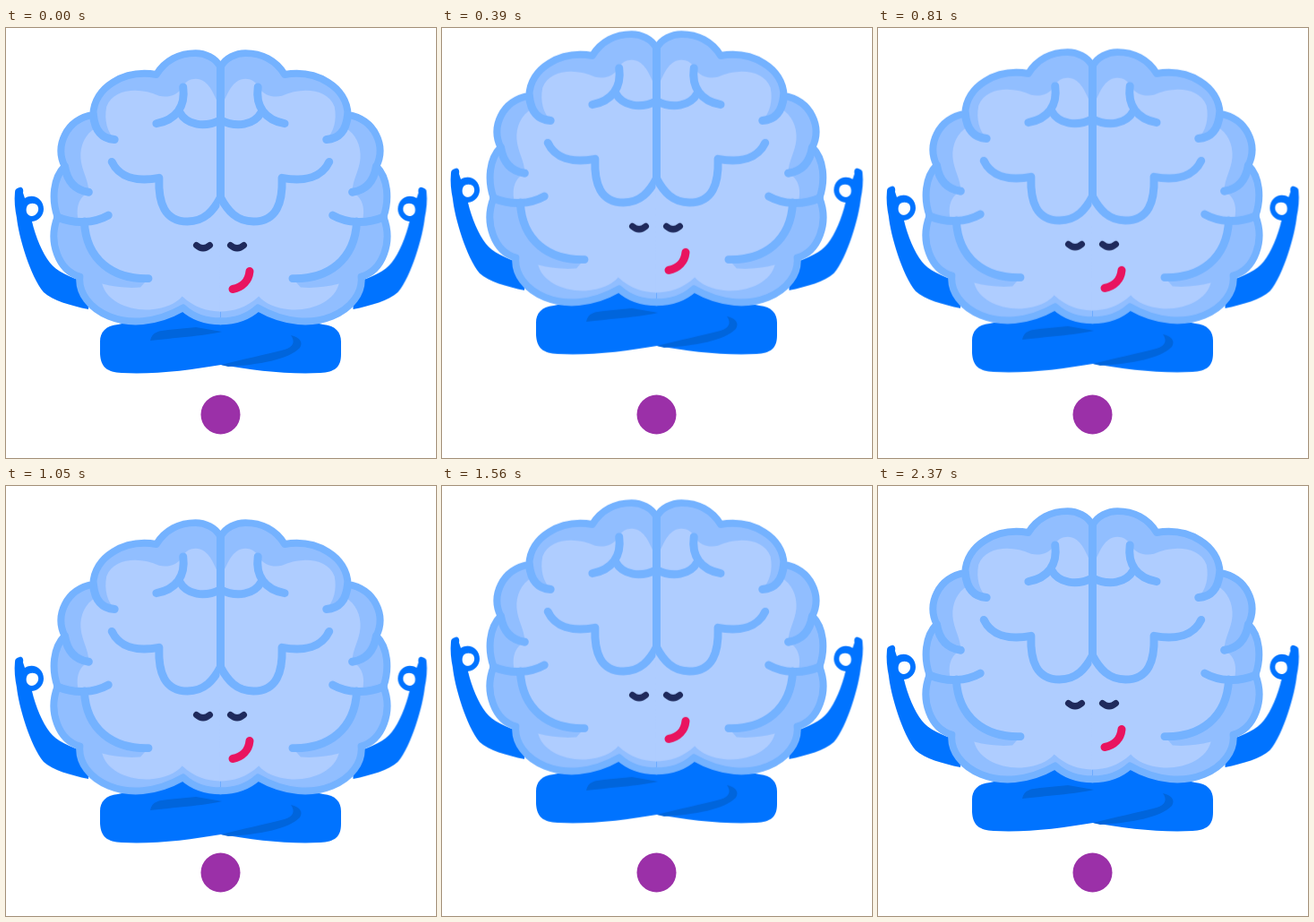
An HTML page for the animation above (2400 ms loop, 480 by 480 pixels).

```html
<!DOCTYPE html>
<html lang="en">
<head>
<meta charset="utf-8">
<title>Meditating brain</title>
<style>
  html, body { margin: 0; width: 100%; height: 100%; overflow: hidden; background: #fff; }
  svg { display: block; width: 100vw; height: 100vh; }
  .skin { fill: #0073ff; }
  .shade { fill: #0065dc; }
  .band { fill: #91beff; }
  .light { fill: #afcdff; }
  .fold { fill: none; stroke: #74b2ff; stroke-width: 9; stroke-linecap: round; stroke-linejoin: round; }
  .rim { stroke-width: 8; }
  .eye { fill: none; stroke: #1f2a5c; stroke-width: 7; stroke-linecap: round; }
  .mouth { fill: none; stroke: #e9145f; stroke-width: 9; stroke-linecap: round; }
</style>
</head>
<body>
<svg viewBox="0 0 480 480">
  <defs>
    <path id="rim" d="M240 44C235 33 222 28 212 28C194 28 178 36 168 52C132 46 98 66 97 97C66 103 54 132 65 155C52 168 50 192 57 212C46 240 58 272 82 279C78 315 135 350 198 314C210 325 225 329 240 329"/>
    <path id="glow" d="M241 88C234 82 232 67 222 60C213 54 202 57 197 66C191 76 181 78 171 76C150 66 120 67 112 88C109 104 113 116 121 125L100 112C88 118 82 132 83 146C84 160 92 170 92 184C80 190 78 202 80 214L88 217C90 260 120 282 159 281L150 291C137 292 122 291 107 287C112 306 135 317 160 316C178 315 190 309 197 301C211 314 225 318 241 318Z"/>
    <g id="folds">
      <path d="M198 66C201 88 190 103 168 107"/>
      <path d="M194 94C202 109 222 112 240 103"/>
      <path d="M118 150C126 167 145 173 171 168C170 196 177 217 203 217C222 217 232 205 240 190"/>
      <path d="M97 97C99 116 107 124 121 125"/>
      <path d="M65 155C68 173 77 182 92 184"/>
      <path d="M57 212C76 220 98 219 114 210"/>
      <path d="M87 217C89 260 119 282 159 281"/>
    </g>
    <path id="arm" class="skin" fill-rule="evenodd" d="M15 178C18 177 20 180 19 184L21 190C30 184 42 190 42 202C42 209 37 215 29 216C33 233 41 252 49 262C56 271 70 278 92 285V314C72 310 52 304 42 295C27 277 14 232 12 212C10 202 9 193 10 183C10 180 12 179 15 178ZM24 198C21 203 23 210 29 210C35 209 38 203 35 198C32 195 27 195 24 198Z"/>
    <g id="half">
      <use href="#rim" class="band"/>
      <use href="#glow" class="light"/>
      <use href="#rim" class="fold rim"/>
      <use href="#folds" class="fold"/>
    </g>
  </defs>

  <circle cx="239.5" cy="431.5" r="22" fill="#9b30a8"/>

  <g id="figure">
    <use href="#arm"/>
    <use href="#arm" transform="matrix(-1 0 0 1 479.5 0)"/>
    <path class="skin" d="M125 331C111 332 105 340 105 350V364C106 379 113 384 129 385C165 387 205 382 240 376C275 382 315 387 351 385C367 384 374 379 374 364V350C374 340 368 332 354 331L281 315H198Z"/>
    <path class="shade" d="M161 349C163 339 171 338 181 337L212 334L241 339C220 344 186 346 161 349Z"/>
    <path class="shade" d="M318 343C328 345 332 351 328 357C316 370 282 376 248 378L240 376C264 370 291 364 311 359C321 356 323 350 318 343Z"/>

    <g transform="matrix(.994 0 0 .994 .9 .3)">
      <use href="#half"/>
      <use href="#half" transform="matrix(-1 0 0 1 480 0)"/>
      <path class="fold" d="M240 42V190"/>
    </g>

    <path class="eye" d="M212.5 242.5Q220 249 227.5 242.5M250.5 242.5Q258 249 265.5 242.5"/>
    <path class="mouth" d="M253 291.5C264 289.5 271 282 272 271.5"/>
  </g>
</svg>
<script>
  const LOOP = 2400;
  // [time in ms, vertical shift]
  const steps = [[0, 0], [445, -22], [1105, 13.5], [1522, -10], [1785, 5], [2160, 0], [LOOP, 0]];
  const frames = steps.map(([ms, y]) => ({
    offset: ms / LOOP,
    transform: `translate(0px, ${y}px)`,
    easing: 'cubic-bezier(.37, 0, .63, 1)'
  }));
  document.getElementById('figure').animate(frames, { duration: LOOP, iterations: Infinity });
</script>
</body>
</html>
```
